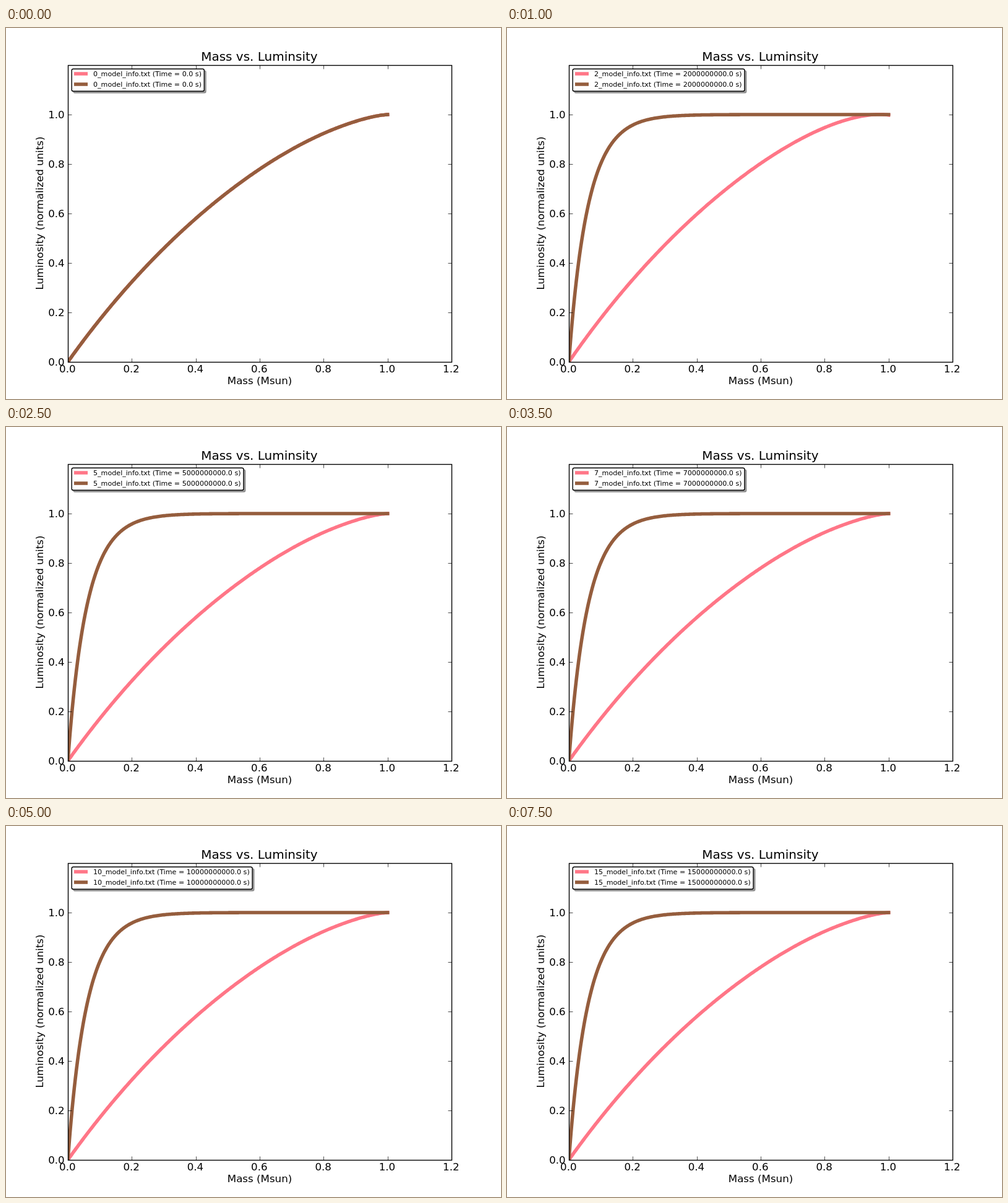
An HTML page for the animation above (8000 ms loop, 800x600 px).

```html
<!DOCTYPE html>
<html lang="en">
<head>
<meta charset="utf-8">
<title>Mass vs. Luminosity</title>
<style>
  html, body { margin: 0; width: 100%; height: 100%; overflow: hidden; background: #fff; }
  svg { display: block; width: 800px; height: 600px; }
  text { font-family: "DejaVu Sans", Verdana, sans-serif; font-size: 16.67px; fill: #000; }
  .title { font-size: 20px; }
  .legend text { font-size: 11.11px; }
  .mid { text-anchor: middle; }
  .end { text-anchor: end; }
  .line { fill: none; stroke-width: 5.56; stroke-linejoin: round; }
  .curves .line { stroke-linecap: square; }
  .pink { stroke: #ff7687; }
  .brown { stroke: #955d3d; }
  .box { fill: none; stroke: #000; stroke-width: 1.39; }
  .legend .box { fill: #fff; }
  .legend .shadow { fill: #4d4d4d; stroke: #4d4d4d; fill-opacity: .5; stroke-opacity: .5; }
  #ticks { stroke: #000; stroke-width: .7; }
</style>
</head>
<body>
<svg viewBox="0 0 800 600">
  <clipPath id="plot"><rect x="100" y="60" width="620" height="480"/></clipPath>
  <g class="curves" clip-path="url(#plot)">
    <path id="pink" class="line pink"/>
    <path id="brown" class="line brown"/>
  </g>
  <path id="ticks"/>
  <rect class="box" x="100.5" y="60.5" width="620" height="480"/>
  <g id="labels"></g>
  <text class="title mid" x="409.4" y="53">Mass vs. Luminsity</text>
  <text class="mid" x="410" y="576">Mass (Msun)</text>
  <text class="mid" transform="translate(59.5 299.5) rotate(-90)">Luminosity (normalized units)</text>
  <g class="legend">
    <rect class="box shadow frame" x="109" y="69" height="36" rx="2.5"/>
    <rect class="box frame" x="106.2" y="66.2" height="36" rx="2.5"/>
    <path class="line pink" d="M110 74H132"/>
    <path class="line brown" d="M110 91H132"/>
    <text class="entry" x="141" y="78"></text>
    <text class="entry" x="141" y="95"></text>
  </g>
</svg>
<script>
  const STEP = 500, STEPS = 16, SAMPLES = 300;
  const $ = id => document.getElementById(id);
  const px = m => 100 + m * 620 / 1.2;
  const py = l => 540 - l * 400;

  // Luminosity as a function of enclosed mass, both from 0 to 1
  const settled = m =>
    m * (1 + (1 - m) * (0.745 + 0.3 * (m - 0.5) ** 2 + 0.1 * m ** 20));
  const nearlySettled = m => 1.03 * settled(m) - 0.032 * m ** 9;
  const saturated = m =>
    1 - Math.exp(-m / (0.064 - 0.007 * Math.exp(-m / 0.09)));

  const knots = [
    [0, 0], [.05, .21], [.1, .395], [.2, .675], [.3, .865], [.4, .968],
    [.495, 1], [.6, .965], [.7, .875], [.8, .72], [.9, .503],
    [.95, .345], [.97, .265], [.98, .21], [.99, .135], [1, .045]
  ];
  const slope = i => {
    const a = knots[Math.max(i - 1, 0)];
    const b = knots[Math.min(i + 1, knots.length - 1)];
    return (b[1] - a[1]) / (b[0] - a[0]);
  };
  // Cubic Hermite curve through the knots
  function hump(m) {
    let i = 0;
    while (i < knots.length - 2 && m > knots[i + 1][0]) i++;
    const [x0, y0] = knots[i], [x1, y1] = knots[i + 1];
    const h = x1 - x0, u = (m - x0) / h, v = 1 - u;
    return y0 * v * v * (1 + 2 * u) + y1 * u * u * (1 + 2 * v)
      + h * u * v * (v * slope(i) - u * slope(i + 1));
  }

  function trace(f) {
    let d = "";
    for (let i = 0; i <= SAMPLES; i++) {
      const m = i / SAMPLES;
      d += (i ? "L" : "M") + px(m).toFixed(2) + " " + py(f(m)).toFixed(2);
    }
    return d;
  }
  const pinkPaths = [settled, hump, nearlySettled, settled].map(trace);
  const brownPaths = [settled, saturated].map(trace);

  function drawAxes() {
    let ticks = "", labels = "";
    for (let i = 0; i <= 6; i++) {
      const v = i / 5, name = v.toFixed(1);
      const x = Math.round(px(v)) + 0.5, y = py(v) + 0.5;
      ticks += `M${x} 540v-5.5M${x} 61v5.5`;
      labels += `<text class="mid" x="${px(v) - 0.7}" y="557">${name}</text>`;
      if (i < 6) {
        ticks += `M101 ${y}h5.5M720 ${y}h-5.5`;
        labels += `<text class="end" x="94.7" y="${py(v) + 6}">${name}</text>`;
      }
    }
    $("ticks").setAttribute("d", ticks);
    $("labels").innerHTML = labels;
  }

  const entries = document.querySelectorAll(".entry");
  const frames = document.querySelectorAll(".frame");

  function show(step) {
    const label = `${step}_model_info.txt (Time = ${(step * 1e9).toFixed(1)} s)`;
    const width = 214.1 + 7.07 * (label.length - 31);
    entries.forEach(e => e.textContent = label);
    frames.forEach(f => f.setAttribute("width", width));
    $("pink").setAttribute("d", pinkPaths[Math.min(step, 3)]);
    $("brown").setAttribute("d", brownPaths[Math.min(step, 1)]);
  }

  const start = performance.now();
  let current = 0;
  function tick() {
    const step = Math.floor((performance.now() - start) / STEP) % STEPS;
    if (step !== current) show(current = step);
    requestAnimationFrame(tick);
  }
  drawAxes();
  show(0);
  requestAnimationFrame(tick);
</script>
</body>
</html>
```
